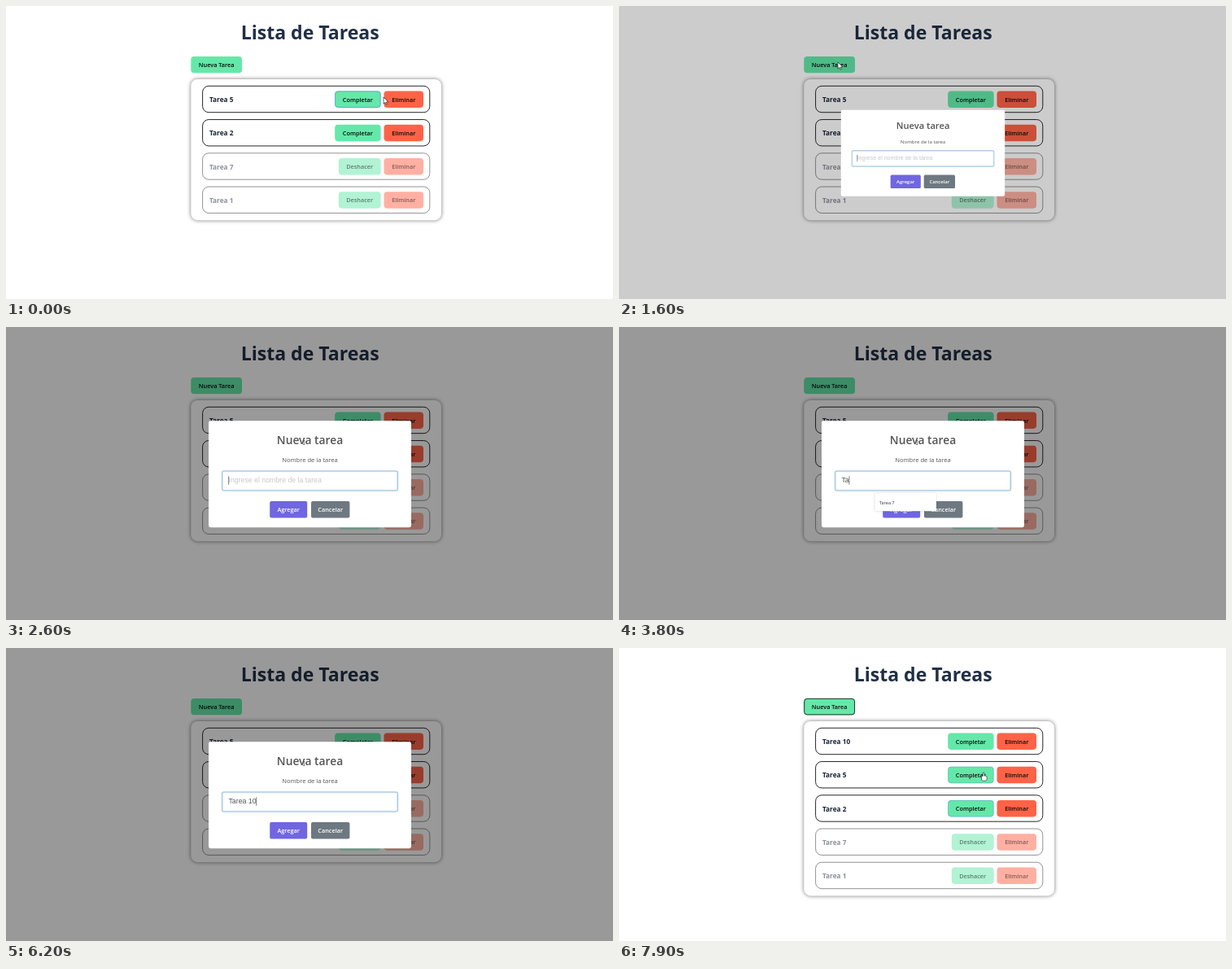
Write an HTML page with a canvas that moves like this. It is 746x360 px and loops after 8000 ms.

```html
<!DOCTYPE html>
<html lang="es">
<head>
<meta charset="utf-8">
<title>Lista de Tareas</title>
<style>
  html, body { margin: 0; width: 100%; height: 100%; overflow: hidden; background: #fff; }
  canvas { display: block; width: 746px; height: 360px; }
</style>
</head>
<body>
<canvas id="stage"></canvas>
<script>
const W = 746, H = 360, LOOP = 8000, STEP = 100;
const SANS = '"Open Sans", "Noto Sans", sans-serif';
const ARIAL = '"Liberation Sans", Arial, sans-serif';
const GREEN = '#64e8a9', RED = '#ff6347', INK = '#213047', GRAY = '#545454';
const OPEN = 1550, CLOSE = 6250, FADE = 250, BLINK = 505;
const NAME = 'Tarea 10';
const TOP = 97.9, PITCH = 41.25, BTN_H = 20.4;

const canvas = document.getElementById('stage');
const dpr = window.devicePixelRatio || 1;
canvas.width = W * dpr;
canvas.height = H * dpr;
const ctx = canvas.getContext('2d');

// Pointer moves along quadratic curves: start, end, control point, goal
const MOVES = [
  { from: -200, to: 0, via: [457, 112], goal: [464, 112] },
  { from: 0, to: 850, via: [380, -18], goal: [270, 55] },
  { from: 950, to: 1300, via: [272, 58], goal: [269, 69] },
  { from: 1750, to: 2100, via: [320, 105], goal: [366, 139] },
  { from: 6700, to: 7550, via: [400, 95], goal: [446, 200] },
  { from: 7650, to: 7900, via: [446, 185], goal: [448, 153] }
];

const mix = (a, b, p) => a + (b - a) * p;
const smooth = p => p * p * (3 - 2 * p);
const clamp = p => Math.max(0, Math.min(1, p));
const modalOpen = t => t >= OPEN && t < CLOSE;
const rowY = i => TOP + i * PITCH;

function pointer(t) {
  let pos = [450, 112];
  for (const { from, to, via, goal } of MOVES) {
    if (t <= from) break;
    const p = smooth(clamp((t - from) / (to - from)));
    pos = pos.map((a, k) => mix(mix(a, via[k], p), mix(via[k], goal[k], p), p));
  }
  return pos;
}

function inside(t, x, y, w) {
  const [px, py] = pointer(t);
  return !modalOpen(t) && px > x && px < x + w && py > y && py < y + BTN_H;
}

// Linear border transition: share of the last FADE ms spent over the button
function hover(t, x, y, w) {
  if (modalOpen(t)) return 0;
  const n = 25;
  let sum = 0;
  for (let k = 0; k < n; k++) sum += inside(t - k * FADE / n, x, y, w);
  return sum / n;
}

function box(x, y, w, h, r, fill, stroke, line = 1) {
  ctx.beginPath();
  ctx.roundRect(x, y, w, h, r);
  if (fill) { ctx.fillStyle = fill; ctx.fill(); }
  if (stroke) { ctx.strokeStyle = stroke; ctx.lineWidth = line; ctx.stroke(); }
}

function text(str, x, y, size, weight, color, align = 'left', family = SANS) {
  ctx.font = `${weight} ${size}px ${family}`;
  ctx.textAlign = align;
  ctx.fillStyle = color;
  ctx.fillText(str, x, y);
}

function shadow(color, blur) {
  ctx.shadowColor = color;
  ctx.shadowBlur = blur * dpr;
}

let overButton = false;

function button(t, label, x, y, w, fill, focused) {
  const ring = (color, line) => box(x + .4, y + .4, w - .8, BTN_H - .8, 3.5, null, color, line);
  box(x, y, w, BTN_H, 3.8, fill);
  const a = hover(t, x, y, w);
  if (a > 0) ring(`rgba(100,108,255,${a})`, .8);
  if (focused) ring('#16291f', .95);
  text(label, x + w / 2, y + 13.1, 7.3, 600, '#0a0a0a', 'center');
  overButton = overButton || inside(t, x, y, w);
}

function row(t, { name, done }, y) {
  ctx.globalAlpha = done ? .5 : 1;
  box(241.6, y + .4, 279.2, 32.4, 7.5, '#fff', '#1c1c1c', .95);
  text(name, 250, y + 20.1, 8.25, 700, '#1b2536');
  if (done) button(t, 'Deshacer', 408.8, y + 6.6, 51.8, GREEN);
  else button(t, 'Completar', 404.2, y + 6.6, 56.4, GREEN);
  button(t, 'Eliminar', 464.5, y + 6.6, 48.5, RED);
  ctx.globalAlpha = 1;
}

function page(t) {
  ctx.fillStyle = '#fff';
  ctx.fillRect(0, 0, W, H);
  text('Lista de Tareas', 373.7, 41.2, 23.05, 700, INK, 'center');
  const focused = (t >= 1500 && t < OPEN) || t >= 6400;
  button(t, 'Nueva Tarea', 227.3, 61.9, 62.7, GREEN, focused);

  const tasks = [5, 2, 7, 1].map((n, i) => ({ name: 'Tarea ' + n, done: i > 1 }));
  if (t >= CLOSE) tasks.unshift({ name: NAME, done: false });
  shadow('rgba(0,0,0,.55)', 5);
  box(227.3, 90, 307.7, 8.2 + tasks.length * PITCH, 8, '#fff');
  shadow('transparent', 0);
  tasks.forEach((task, i) => row(t, task, rowY(i)));
}

// Overshoot, undershoot, settle
function popScale(t) {
  const p = clamp((t - OPEN) / 300);
  const ease = (a, b, from, to) => mix(a, b, smooth((p - from) / (to - from)));
  if (p < .45) return ease(.7, 1.05, 0, .45);
  if (p < .8) return ease(1.05, .95, .45, .8);
  return ease(.95, 1, .8, 1);
}

// First letter, a pause, then an even typing rate
const keyTime = i => i === 0 ? 3190 : 3790 + (i - 1) * 150;

function field(t) {
  box(266, 177.4, 215, 23.2, 2, '#fff', 'rgba(100,150,200,.5)', 2.4);
  box(266.3, 177.7, 214.4, 22.6, 1.6, '#fff', '#b4dbed', .6);
  let count = 0;
  while (count < NAME.length && t >= keyTime(count)) count++;
  const typed = NAME.slice(0, count);
  const hint = 'Ingrese el nombre de la tarea';
  text(typed || hint, 273.5, 191.4, 8.76, 400, typed ? GRAY : '#c8c8c8', 'left', ARIAL);

  const since = t - (count ? keyTime(count - 1) : 1590);
  if (Math.floor(since / BLINK) % 2 === 0) {
    ctx.fillStyle = '#444';
    ctx.fillRect(273.4 + ctx.measureText(typed).width, 183.3, .7, 10.4);
  }
}

function modalButton(label, x, w, fill) {
  box(x, 214, w, BTN_H, 2, fill);
  text(label, x + w / 2, 227.1, 7.3, 600, '#fff', 'center');
}

function modal(t) {
  ctx.fillStyle = `rgba(0,0,0,${.4 * clamp((t - OPEN) / 100)})`;
  ctx.fillRect(0, 0, W, H);
  const s = popScale(t), cx = 373.5, cy = 180.7;
  ctx.save();
  ctx.translate(cx, cy);
  ctx.scale(s, s);
  ctx.translate(-cx, -cy);
  box(249, 115.2, 249, 131, 2.4, '#fff');
  text('Nueva tarea', cx, 143.8, 13.8, 600, GRAY, 'center');
  text('Nombre de la tarea', cx, 165.7, 7.6, 400, GRAY, 'center');
  field(t);
  modalButton('Agregar', 324.2, 46, '#7066e0');
  modalButton('Cancelar', 375, 47.4, '#6e7881');
  if (t >= 3300 && t < keyTime(6)) {
    shadow('rgba(0,0,0,.25)', 2);
    box(314.3, 204, 75.7, 22.3, 1, '#fff');
    shadow('transparent', 0);
    text('Tarea 7', 320, 217.7, 5.5, 400, '#333');
  }
  ctx.restore();
}

function arrow(x, y) {
  const outline = new Path2D('M0 0V8.2L1.9 6.5L3.1 9.2L4.4 8.6L3.2 6L5.8 5.8Z');
  ctx.save();
  ctx.translate(x, y);
  ctx.fillStyle = '#fff';
  ctx.strokeStyle = '#222';
  ctx.lineWidth = .7;
  ctx.fill(outline);
  ctx.stroke(outline);
  ctx.restore();
}

function hand(x, y) {
  box(x - 2.6, y + 4, 6.6, 6, 2, '#fff', '#222', .7);
  box(x - .9, y, 1.9, 6.5, .9, '#fff', '#222', .7);
  box(x - 2, y + 4.5, 5.4, 5, 1.5, '#fff');
}

function beam(x, y) {
  ctx.fillStyle = GRAY;
  ctx.fillRect(x - .2, y + .2, .8, 5.6);
  ctx.fillRect(x - 1, y, 2.4, .6);
  ctx.fillRect(x - 1, y + 5.4, 2.4, .6);
}

function draw(t) {
  ctx.setTransform(dpr, 0, 0, dpr, 0, 0);
  overButton = false;
  page(t);
  if (modalOpen(t)) modal(t);
  const overText = modalOpen(t) && t >= 2100;
  const cursor = overText ? beam : overButton ? hand : arrow;
  cursor(...pointer(t));
}

const start = performance.now();
function tick() {
  const t = (performance.now() - start) % LOOP;
  draw(Math.floor(t / STEP) * STEP);
  requestAnimationFrame(tick);
}
tick();
</script>
</body>
</html>
```
